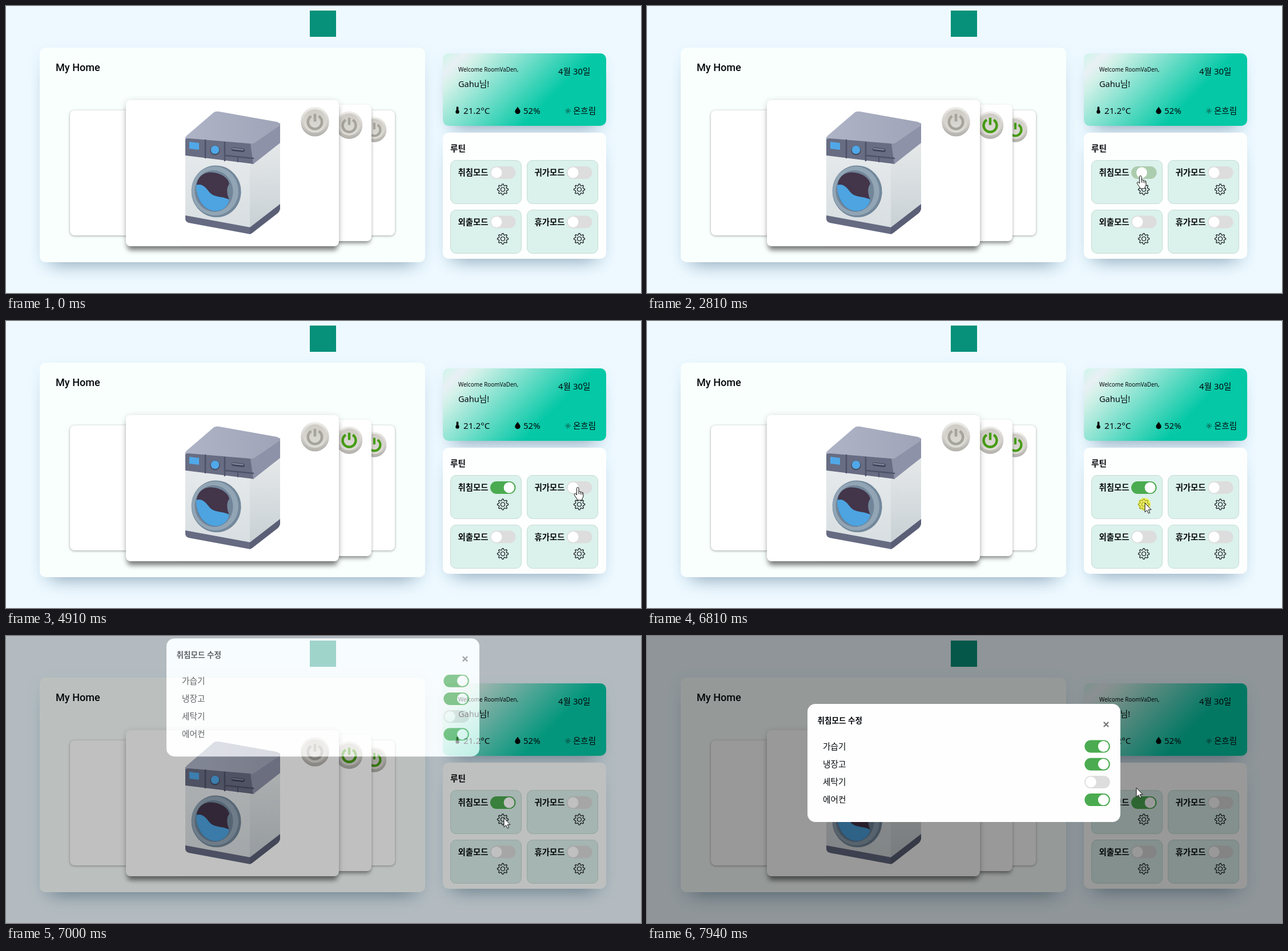
Write an HTML page that moves like this. It is 1112 by 503 pixels and loops after 8 s.

```html
<!DOCTYPE html>
<html lang="ko">
<head>
<meta charset="utf-8">
<title>My Home</title>
<style>
html, body { margin: 0; width: 100%; height: 100%; overflow: hidden; }
body { position: relative; background: #eef9ff; }
div, svg { position: absolute; box-sizing: border-box; }
svg { left: 0; top: 0; width: 1112px; height: 503px; overflow: visible; }
text { font-family: 'Noto Sans', 'Noto Sans CJK KR', sans-serif; fill: #05080c; }
.title { font-family: Roboto, sans-serif; }
.panel { border-radius: 10px; background: #fdfffe;
  box-shadow: 0 22px 30px -20px rgba(40,80,110,.48), 0 6px 24px rgba(110,165,200,.12); }
.home { background: #f9fffd; }
.welcome { background: linear-gradient(135deg, #cdf5e8, #e9f0f5 9%, #d2f1e8 16%, #04c8a6 65%); }
.back { border-radius: 8px; background: #fff; box-shadow: 0 1px 4px rgba(0,0,0,.35); }
.mid { border-radius: 8px; background: #fff; box-shadow: 0 6px 7px -2px rgba(0,0,0,.38), 0 1px 5px rgba(0,0,0,.12); }
.front { border-radius: 8px; background: #fff; box-shadow: 0 10px 9px -3px rgba(0,0,0,.45), 0 2px 12px rgba(0,0,0,.17); }
.mode { border-radius: 10px; background: #dbf1eb; border: 1px solid #c6ddd6; }
#modal { border-radius: 14px; background: #fefefe; box-shadow: 0 0 0 1200px rgba(0,0,0,.4); }
#modal svg { left: -281px; top: -119px; }
</style>
</head>
<body>
<script>
const OFF = [221, 221, 221], ON = [75, 171, 80];
const box = (x, y, w, h, cls, inner = '', id = '') =>
  `<div id="${id}" class="${cls}" style="left:${x}px;top:${y}px;width:${w}px;height:${h}px">${inner}</div>`;
const layer = inner => `<svg>${inner}</svg>`;
const text = (x, y, size, str, weight = 400, cls = '') =>
  `<text x="${x}" y="${y}" font-size="${size}" font-weight="${weight}" class="${cls}">${str}</text>`;
const path = (d, fill, extra = '') => `<path d="${d}" fill="${fill}" ${extra}/>`;
const line = (d, color, width) => path(d, 'none', `stroke="${color}" stroke-width="${width}" stroke-linecap="round"`);

const toggle = (x, cy, on, id = '') => `<g id="${id}">
  <rect x="${x}" y="${cy - 11}" width="44.5" height="22" rx="11" fill="rgb(${on ? ON : OFF})"/>
  <circle cx="${x + (on ? 33 : 11)}" cy="${cy}" r="9.4" fill="#fff"/></g>`;

const power = (cx, cy, r, cls = '') => `<g transform="translate(${cx} ${cy}) scale(${r / 25})">
  <circle cy="2.5" r="24.5" fill="#8d8a84" opacity=".65"/>
  <circle r="24.5" fill="url(#rim)"/><circle r="20.5" fill="url(#cap)"/>
  <path class="${cls}" d="M-6.5 -8.5A12.2 12.2 0 1 0 6.5 -8.5M0 -12.4V1" fill="none" stroke="#a6a49d" stroke-width="4.7"/></g>`;

function gear(cx, cy) {
  let points = '';
  for (let i = 0; i < 64; i++) {
    const a = i * Math.PI / 32;
    const r = 8.2 + 1.3 * Math.max(-1, Math.min(1, 1.7 * Math.cos(8 * a)));
    points += `${cx + r * Math.sin(a)},${cy - r * Math.cos(a)} `;
  }
  return `<g fill="none" stroke="#10151a" stroke-width="1.2"><polygon points="${points}"/><circle cx="${cx}" cy="${cy}" r="3.5"/></g>`;
}

const mode = (x, y, name, id) => box(x, y, 124.5, 77, 'mode') + layer(
  text(x + 13.5, y + 27, 14.4, name, 700) + toggle(x + 70, y + 22, false, id) + gear(x + 92, y + 51.5));

const washer =
  path('M314 262L428 277 428 390 314 370Z', 'url(#body)') +
  path('M427 277L480 238 480 349 427 390Z', 'url(#side)') +
  path('M314 367L428 388 428 400 320 380Q314 378 314 373Z', '#666b82') +
  path('M427 388L480 347 480 356Q479 360 476 363L431 398 427 400Z', '#5a5f76') +
  path('M314 230L428 240Q434 241 434 248L434 277 314 262Z', '#686d83') +
  path('M428 241L480 205 480 240 433 277Z', '#8d92a8') +
  path('M314 234Q314 228 319 225L362 188Q366 184 373 185L474 203Q481 205 479 210L435 240Q432 242 426 241L320 232Q315 232 314 234Z', 'url(#top)') +
  line('M349 235V266M383 239V271M384 262L433 267', '#4d5268', 2.5) +
  line('M406 264V273', '#4d5268', 2) +
  line('M398 251L415 253', '#3f4459', 6) + line('M397 250L415 252', '#8a90a4', 2) +
  path('M321 238L338 240 338 252 321 250Z', '#50a8e8') +
  '<circle cx="366" cy="253" r="8.5" fill="#464b60"/><circle cx="366" cy="252" r="7.3" fill="#50a8e8"/>' +
  '<g transform="rotate(-8 367 324)"><ellipse cx="368" cy="325" rx="43.5" ry="45.5" fill="#73889b"/>' +
  '<ellipse cx="366" cy="324" rx="41" ry="43" fill="#91a5b5"/><ellipse cx="364" cy="324" rx="33.5" ry="36.5" fill="#72869a"/></g>' +
  path('M334 314C335 298 349 289 364 292C379 294 390 303 391 312C386 317 386 330 391 339C388 352 378 361 363 359C345 356 332 338 334 314Z', '#43354a') +
  path('M333 314C343 310 350 318 356 326C364 336 378 333 391 339C389 352 378 361 363 359C345 356 333 338 333 314Z', '#4da4e1');

const gradient = (id, from, to, dir = 'x2="0" y2="1"') =>
  `<linearGradient id="${id}" ${dir}><stop stop-color="${from}"/><stop offset="1" stop-color="${to}"/></linearGradient>`;

document.body.innerHTML =
  layer('<defs>' + gradient('rim', '#efedea', '#b9b6b0') + gradient('cap', '#cfccc6', '#dedcd6') +
    gradient('body', '#e5e9eb', '#d8dee1') + gradient('side', '#e6e9ea', '#c8d0d4') +
    gradient('top', '#aeb4c6', '#a0a4b8', '') + '</defs><rect x="532" y="8" width="46" height="46" fill="#07917a"/>') +
  box(59, 73, 675, 375.5, 'panel home') +
  box(112, 183, 569, 219, 'back') + layer(power(645, 215.5, 21.5, 'live')) +
  box(300, 173, 340, 239, 'mid') + layer(power(601, 207.5, 23.5, 'live')) +
  box(210, 165, 373, 255.5, 'front') +
  layer(text(87, 114, 18.1, 'My Home', 500, 'title') + washer + power(541, 201.5, 25)) +
  box(765, 83, 286, 126.5, 'panel welcome') +
  box(765, 222, 286, 221, 'panel') +
  layer(text(792, 115, 9.9, 'Welcome RoomVaDen,') + text(792, 142, 14.6, 'Gahu님!') +
    text(967, 120, 14.8, '4월 30일') + text(801, 189, 15.2, '21.2°C') +
    text(906, 189, 15, '52%') + text(993, 189, 14.5, '온흐림') + text(778, 255, 14.6, '루틴', 700) +
    line('M790.5 178V185', '#000', 3.6) + '<circle cx="790.5" cy="185.5" r="3.2"/>' +
    path('M896 176.5C897 179 900.7 182 900.7 185A4.7 4.2 0 0 1 891.3 185C891.3 182 895 179 896 176.5Z', '#000') +
    '<g fill="none" stroke="#10251f"><circle cx="984" cy="184" r="2"/><circle cx="984" cy="184" r="4.4" stroke-dasharray="1.2 2.25"/></g>') +
  mode(778, 270, '취침모드', 'sleep') + mode(912, 270, '귀가모드') +
  mode(778, 356.5, '외출모드') + mode(912, 356.5, '휴가모드') +
  box(281, 119, 548, 207, '', layer(text(298.5, 153, 13.6, '취침모드 수정', 700) +
    line('M800.5 151.5L807.5 158.5M807.5 151.5L800.5 158.5', '#777', 2.4) +
    ['가습기', '냉장고', '세탁기', '에어컨'].map((name, i) =>
      text(308, 198.5 + i * 31.2, 14.7, name) + toggle(766.3, 193.5 + i * 31.2, i != 2)).join('')), 'modal') +
  layer(`<g id="cursor"><circle id="click" cx="-1" cy="2" r="11" fill="#f5ee1e" opacity=".65"/>
    <path id="arrow" d="M0 0V16L3.7 12.6 6.3 18.2 8.7 17.1 6.2 11.7H11Z" fill="#fff" stroke="#111"/>
    <path id="hand" d="M-1.6 13V1.5Q-1.6 -.4 .2 -.4T2 1.5V7Q4 5.8 5 7.6Q7 6.6 7.8 8.6Q10 8 10 10.4V15Q9.6 18 8 19V22H-.8V20Q-3 17.5 -5.6 13Q-6.4 11 -4.8 10.6T-1.6 13ZM2 7V11.5M5 8V12M7.8 9V12.5" fill="#fff" stroke="#111"/></g>`);

const $ = id => document.getElementById(id);
const [track, knob] = $('sleep').children;
const liveIcons = document.querySelectorAll('.live');

const smooth = p => p * p * (3 - 2 * p);
const out = p => p * (2 - p);

// Stepped progress: the first step lands at `first`, the final one at `last`
const stepped = (t, first, last, steps) => t < first ? 0 :
  Math.min(1, Math.floor((t - first) / Math.max(1, last - first) * (steps - 1) + 1.001) / steps);

// CSS "ease" curve
function ease(x) {
  let lo = 0, hi = 1, s;
  for (let i = 0; i < 20; i++) {
    s = (lo + hi) / 2;
    if (.75 * s * (1 - s) + s ** 3 < x) lo = s; else hi = s;
  }
  return x >= 1 ? 1 : .3 * s * (1 - s) ** 2 + 3 * s * s * (1 - s) + s ** 3;
}

// first, last, steps, x, y, easing
const MOVES = [
  [990, 1610, 10, 862, 287, out],
  [1930, 2070, 3, 864, 298, out],
  [3820, 4354, 8, 1017, 293, smooth],
  [4430, 4430, 1, 1007, 292, smooth],
  [4760, 4910, 3, 1001, 292, smooth],
  [6030, 6520, 8, 872, 319, smooth],
  [7870, 7940, 2, 857, 266, smooth],
];
const between = (v, a, b) => v >= a && v < b;

function draw(t) {
  let x = 1010, y = 518;
  for (const [first, last, steps, toX, toY, easing] of MOVES) {
    const p = easing(stepped(t, first, last, steps));
    x += (toX - x) * p;
    y += (toY - y) * p;
  }
  const overToggle = between(y, 281, 303) && (between(x, 848, 892) || between(x, 982, 1027));
  $('cursor').setAttribute('transform', `translate(${x} ${y})`);
  $('hand').style.display = overToggle ? '' : 'none';
  $('arrow').style.display = overToggle ? 'none' : '';
  $('click').style.display = between(t, 2340, 2610) || between(t, 6810, 6930) ? '' : 'none';

  const on = stepped(t, 2810, 2940, 3);
  track.setAttribute('fill', `rgb(${OFF.map((c, i) => Math.round(c + (ON[i] - c) * on))})`);
  knob.setAttribute('transform', `translate(${22 * on})`);
  liveIcons.forEach(icon => icon.setAttribute('stroke', on ? '#479c14' : '#a6a49d'));

  // The dialog slides in over 400 ms, seen at 15 pictures a second
  const drop = t < 6930 ? 0 : ease((77 + 66 * Math.floor((t - 6930) / 70)) / 400);
  $('modal').style.opacity = drop;
  $('modal').style.transform = `translateY(${-300 * (1 - drop)}px)`;
}

const start = performance.now();
(function tick() {
  draw((performance.now() - start) % 8000);
  requestAnimationFrame(tick);
})();
</script>
</body>
</html>
```
